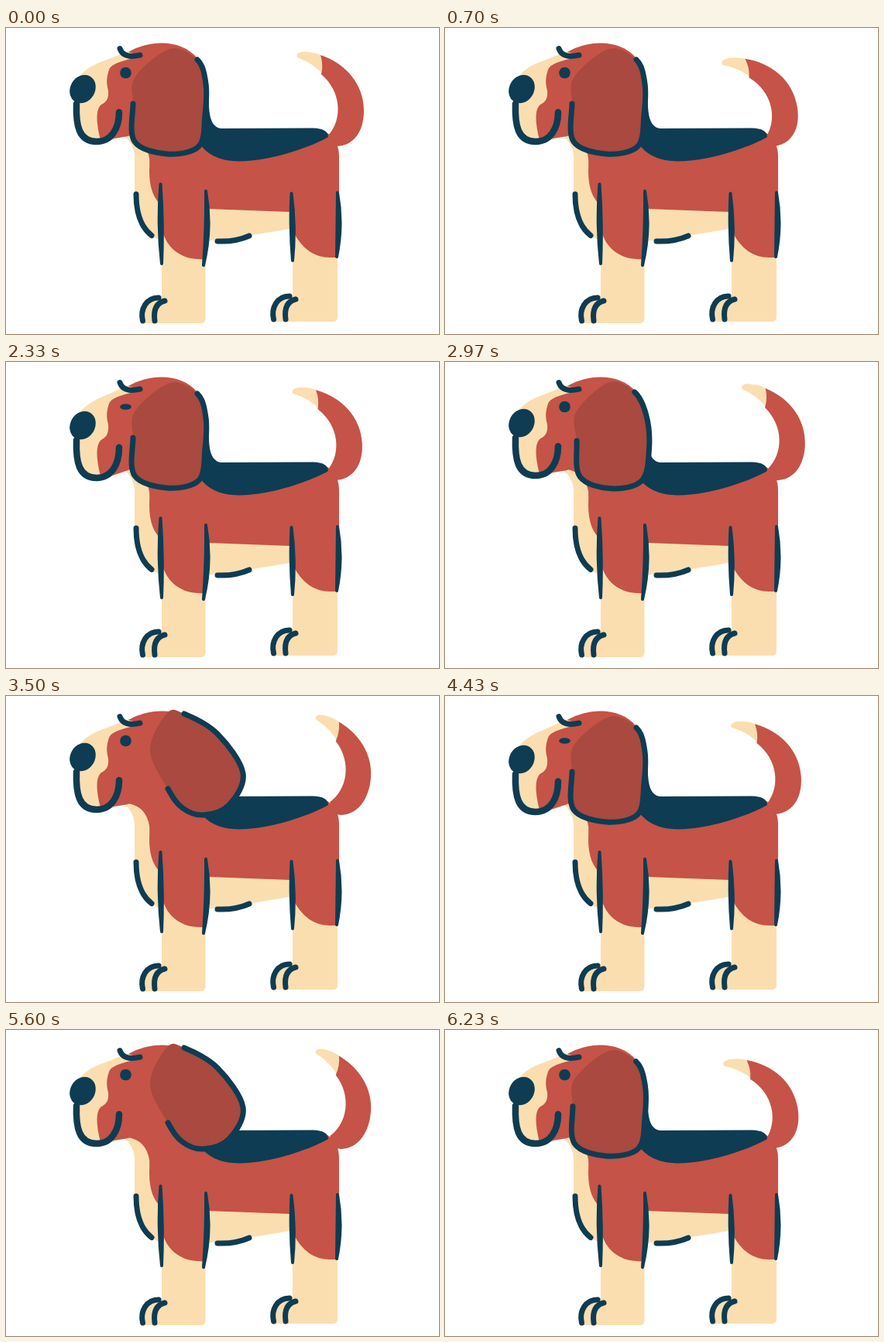
An HTML page for the animation above (6310 ms loop, 559 by 396 pixels).

```html
<!DOCTYPE html>
<html lang="en">
<head>
<meta charset="utf-8">
<title>Dog</title>
<style>
  html, body { margin: 0; width: 100%; height: 100%; overflow: hidden; background: #fff; }
  svg { display: block; width: 100%; height: 100%; }
  .red { fill: #c55347; }
  .cream { fill: #fbdeb0; }
  .navy { fill: #0e3c53; }
  .line { fill: none; stroke: #0e3c53; stroke-width: 7; stroke-linecap: round; stroke-linejoin: round; }
  #legs { stroke: #0e3c53; stroke-width: 4; stroke-linejoin: round; }
</style>
</head>
<body>
<svg viewBox="0 0 559 396">
  <g id="tail">
    <path class="cream" d="M376 38C373 32 382 30 388 31Q400 31 410 37L411 62Q398 46 376 38Z"/>
    <path class="red" d="M406 35C439 46 462 73 462 107C462 136 447 153 426 153L416 139C435 118 433 82 407 60Q410 48 406 35Z"/>
  </g>

  <!-- body -->
  <path class="cream" d="M152 139H190L206 225L368 236L372 259Q310 270 257.500 276V376Q257 382 252 382H178C175 362 182 348 201 347V275L188 270Q166 255 166 213V165Q165 150 152 139Z"/>
  <path class="cream" d="M370 255H428V374Q428 380 422 380H347C344 360 352 346 370 345Z"/>
  <path class="red" d="M186 150L415 136Q430 146 430 166V250L428 297H418Q388 297 371 264L366 238L260 234L256 299C230 301 210 288 203 266L202 230Q185 218 185 185Z"/>

  <!-- head -->
  <path id="muzzle" class="cream"/>
  <path id="face" class="red"/>
  <path class="red" d="M158 31C186 15 226 14 247 39L262 130L256 175L186 178Q185 143 157 139L168 60L174 36Z"/>
  <path class="navy" d="M246 38Q262 58 262 85C261 112 264 130 280 130L396 129.500Q416 130 416 141C400 151 345 172.500 300 172.500Q266 172 251 151L256 85Z"/>

  <!-- leg, chest and belly lines -->
  <path id="legs" class="navy"/>
  <path class="line" d="M168 215Q168 253 188 268.500"/>
  <path class="line" d="M273 276Q296 277 314 269"/>
  <g id="toes" class="line">
    <path d="M176.500 379C173 364 181 349 197 349"/>
    <path d="M192 379Q189 357 205 353"/>
  </g>
  <use href="#toes" x="169" y="-2"/>

  <path id="earFill" fill="#a9493f"/>
  <path id="earLine" class="line"/>

  <path id="mouth" class="line" style="stroke-width:8.500"/>
  <ellipse id="nose" class="navy" rx="16" ry="19"/>
  <path class="line" d="M147 26.500C150 36 160 38 173 35"/>
  <ellipse id="eye" class="navy" cx="154.500" cy="58" rx="7.300"/>
</svg>
<script>
const $ = id => document.getElementById(id);
const set = (id, attrs) => { for (const k in attrs) $(id).setAttribute(k, attrs[k]); };

const LOOP = 6310, CYCLE = 2100, PART = 700, HOLD = 100, STEP = 200 / 3;
const LEAD = 16; // keeps each step from showing a screen refresh late

// Ear key points, hanging and lifted, clockwise from the top
const EAR = [
  { down: [247, 41], up: [230, 23] },
  { down: [258, 72], up: [273, 49] },
  { down: [257, 112], up: [306, 100] },
  { down: [249, 153], up: [288, 141] },
  { down: [208, 163], up: [255, 154] },
  { down: [166, 147], up: [228, 145] },
  { down: [164, 98], up: [209, 120] },
  { down: [167, 63], up: [186, 70] },
  { down: [212, 27], up: [208, 22] }
];

// Smooth curve over the first n sides of a closed ring of points
function spline(ring, n) {
  const at = i => ring[(i + ring.length) % ring.length];
  const handle = (i, s) => at(i).map((v, k) => v + s * (at(i + 1)[k] - at(i - 1)[k]) / 6);
  let d = `M${ring[0]}`;
  for (let i = 0; i < n; i++) d += `C${handle(i, 1)} ${handle(i + 1, -1)} ${at(i + 1)}`;
  return d;
}

// Tapered line from (x, y) down to (x2, y2), bowed sideways
function blade(x, y, x2, y2, bow) {
  const mx = (x + x2) / 2 + bow, my = (y + y2) / 2;
  return `M${x} ${y}Q${mx + 4} ${my} ${x2} ${y2}Q${mx - 4} ${my} ${x} ${y}Z`;
}

// Motion is held in steps, with a longer rest at the start of each part.
function snap(ms) {
  const t = Math.min(ms % LOOP, 3 * CYCLE - 1) % CYCLE;
  const start = Math.floor(t / PART) * PART, r = t - start;
  return r < HOLD ? start : start + HOLD + Math.floor((r - HOLD) / STEP) * STEP;
}

function drawTail(t) {
  const a = t / 420 * 2 * Math.PI;
  const deg = .8 + 11.56 * Math.sin(a) - .8 * Math.cos(a) - .92 * Math.sin(2 * a);
  set("tail", { transform: `rotate(${deg} 425 148)` });
}

function drawEar(t) {
  const x = Math.max(0, 1 - Math.abs(t / PART - 2));
  const lift = (1 - Math.cos(Math.PI * x)) / 2;
  const ring = EAR.map(({ down, up }) => {
    const p = down.map((v, k) => v + (up[k] - v) * lift);
    const sag = Math.sin(Math.PI * lift) * (p[1] - 20) / 28;
    return [p[0], p[1] + sag];
  });
  set("earFill", { d: spline(ring, ring.length) + "Z" });
  set("earLine", { d: spline(ring, 6) });
}

function drawFace(t) {
  const s = t < PART ? Math.sin(Math.PI * t / PART) ** 2 : 0;
  const n = 4 * s, h = n / 2;
  set("muzzle", { d: `M95 ${63 + n}Q104 ${50 + n} 128 ${42 + h}L158 30L178 36L140 ${145 + n}H117Q90 ${145 + n} 91 ${98 + n}Z` });
  set("face", { d: `M176 36C158 41 137 44 133 54C129 66 130 72 132 81C133 ${94 + h} 128 ${96 + h} 122 ${100 + h}` +
    `Q113 ${110 + h} 122 ${145 + n}L140 ${143 + n}L158 140L170 120Z` });
  set("mouth", { d: `M91 ${98 + n}C90 ${126 + n} 94 ${147 + n} 117 ${147 + n}C136 ${147 + n} 146 ${130 + n} 146 ${109 + h}` });
  set("nose", { transform: `translate(99 ${79 + n}) rotate(30)` });
  set("eye", { ry: 7.3 - 4.6 * s });
}

set("legs", { d: blade(199.5, 202, 201, 305, -1) + blade(258, 211, 255, 307, 6) +
  blade(368.5, 214, 370, 301, 1) + blade(428, 213, 427, 296, 4) });

const begin = performance.now();
function tick() {
  const t = snap(performance.now() - begin + LEAD);
  drawTail(t);
  drawEar(t);
  drawFace(t);
  requestAnimationFrame(tick);
}
tick();
</script>
</body>
</html>
```
